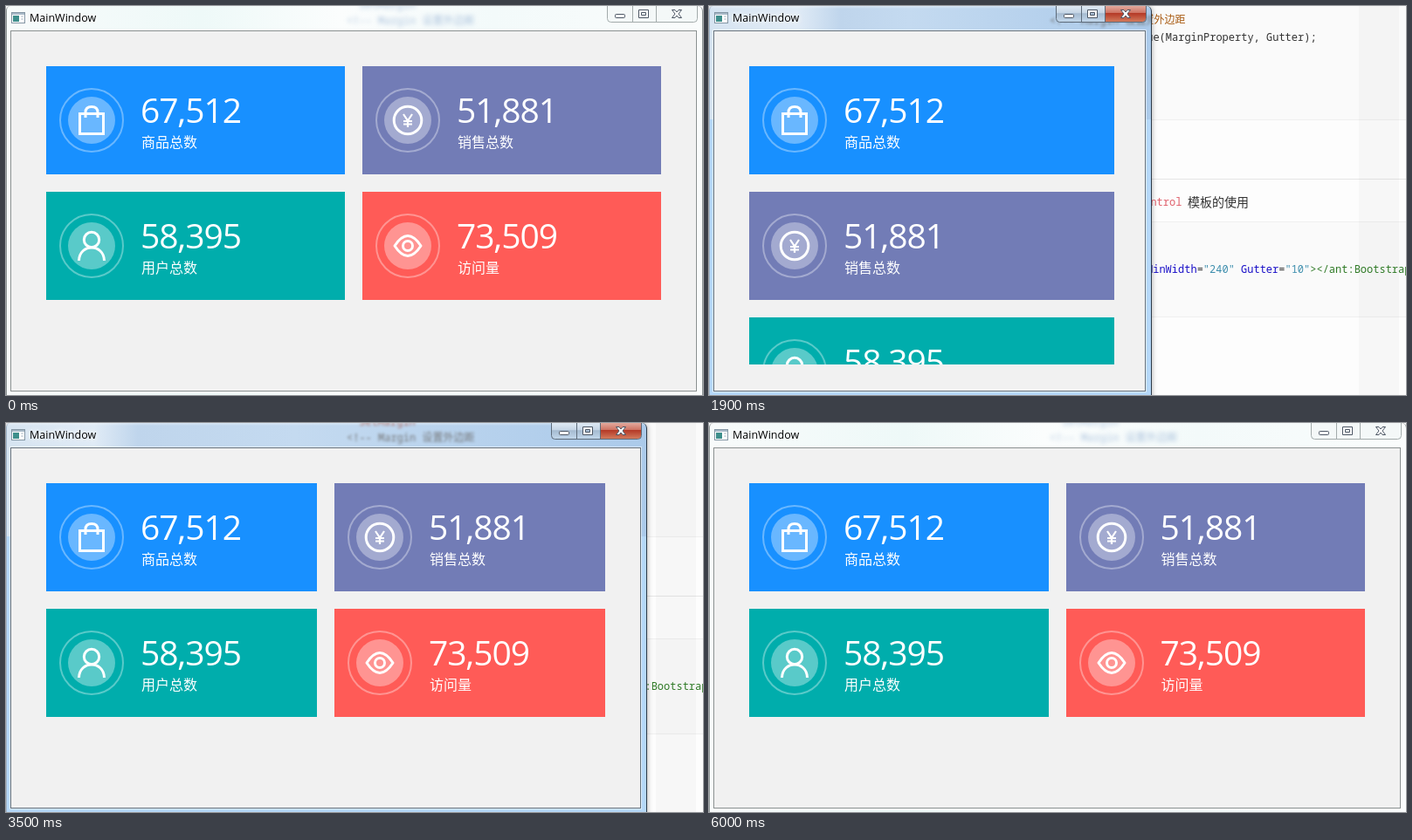
An HTML page for the animation above (6100 ms loop, 798 px wide and 446 px high).

```html
<!DOCTYPE html>
<html lang="zh">
<head>
<meta charset="utf-8">
<style>
html, body { margin: 0; width: 100%; height: 100%; overflow: hidden; }
body { position: relative; background: #fdfdfd; font-family: "Open Sans", "Noto Sans CJK SC", sans-serif; }
body *, svg { box-sizing: border-box; }
body > *, #win > * { position: absolute; }

/* Page behind the window */
.block { left: 0; width: 798px; background: #fafafa; border: solid #efefef; border-width: 1px 0; }
.band { left: 744px; top: 0; width: 46px; height: 446px; background: #00000006; }
.rule { left: 0; top: 198px; width: 798px; height: 1px; background: #e5e5e5; }
.code { font: 12px/16px "Noto Sans Mono", "Noto Sans CJK SC", monospace; white-space: pre; color: #333; }
.code i { font-style: normal; }
.attr { color: #1a10c8; } .val { color: #3f8fae; } .tag { color: #2f7a26; }

/* Window frame */
#win {
  left: 0; top: 0; height: 460px; overflow: hidden;
  border: solid #2d3b4a; border-width: 0 1px; border-left-color: #9fb4c8; border-radius: 5px 6px 0 0;
  background: linear-gradient(#fff6, #fff0 3px),
    linear-gradient(#d9e5f000 130px, #b5d8f8 130px),
    linear-gradient(90deg, #d6e4f1, #e0ebf6 100px, #bfd5ec 150px, #c4daf0 45%, #abcaea);
  box-shadow: 0 0 6px #0005;
}
#win.idle {
  border-color: #8d9494; box-shadow: none;
  background: linear-gradient(90deg, #f8fbfb, #eef9f8 28%, #fbfdfd 48%, #f3fafa 70%, #fafcfc);
}
#win > * { margin-left: -1px; }
.ghost { left: 390px; top: 9px; filter: blur(1.8px); opacity: .75; color: #5c5650; }
.ghost.top { left: 404px; top: -9px; color: #a04c3c; }
.idle .ghost { color: #5b86bc; filter: blur(2.4px); opacity: .5; }
.title { left: 27px; top: 5px; font-size: 12.5px; line-height: 17px; color: #000; text-shadow: 0 0 7px #fff, 0 0 7px #fff; }
.app { left: 6px; top: 7px; }
#win > .caption { right: 5px; top: 0; margin: 0; }
.client { left: 5px; right: 6px; top: 28px; height: 414px; background: #f1f1f1; border: 1px solid #66727d; box-shadow: 0 0 0 1px #fff8; }
.idle .client { border-color: #8a9090; }

/* Cards */
#cards {
  left: 36px; top: 59px; height: 352px; padding: 10px; overflow: hidden;
  display: grid; grid-auto-rows: 124px; gap: 20px;
}
.card { position: relative; color: #fff; }
.card > * { position: absolute; }
.card b { left: 108px; top: 25px; font-weight: 500; font-size: 39px; line-height: 50px; letter-spacing: -1px; }
.card span { left: 109px; top: 75px; font: 500 16px/22px "Noto Sans CJK SC", sans-serif; white-space: nowrap; }
.card svg { left: 15px; top: 25px; }
</style>
</head>
<body>
<div class="block" style="top:-2px;height:133px"></div>
<div class="block" style="top:247px;height:110px"></div>
<div class="rule"></div>
<div class="band"></div>
<div class="code" style="left:464px;top:8px;color:#a85a10">// 设置外边距</div>
<div class="code" style="left:458px;top:28px">SetValue(MarginProperty, Gutter);</div>
<div class="code" style="left:455px;top:217px"><i style="color:#e0606c">ItemsControl</i></div>
<div class="code" style="left:548px;top:216px;font-size:14px;line-height:18px">模板的使用</div>
<div class="code" style="left:357px;top:294px"><i class="tag">&lt;ant:BootstrapPanel</i> <i class="attr">MinWidth</i>=<i class="val">"240"</i> <i class="attr">Gutter</i>=<i class="val">"10"</i><i class="tag">&gt;&lt;/ant:BootstrapPanel&gt;</i></div>

<div id="win">
  <div class="code ghost top">SetMargin</div>
  <div class="code ghost">&lt;!-- Margin 设置外边距</div>
  <svg class="app" width="16" height="14">
    <rect x=".5" y=".5" width="15" height="12" fill="#fff" stroke="#8496a4"/>
    <path d="M1 2H15" stroke="#a9bac8" stroke-width="2"/>
    <rect x="2" y="4" width="7" height="7" fill="#3f8f8c"/>
    <path d="M11 5H14M11 8H14" stroke="#b0bcc6"/>
  </svg>
  <div class="title">MainWindow</div>
  <svg class="caption" width="104" height="20">
    <defs>
      <linearGradient id="glass" x2="0" y2="1"><stop stop-color="#e3edf6"/><stop offset=".45" stop-color="#c5d5e5"/><stop offset=".5" stop-color="#a5bbd1"/><stop offset="1" stop-color="#c3d8ec"/></linearGradient>
      <linearGradient id="red" x2="0" y2="1"><stop stop-color="#e6b0a4"/><stop offset=".45" stop-color="#cf7565"/><stop offset=".5" stop-color="#b53a27"/><stop offset="1" stop-color="#d27a5c"/></linearGradient>
    </defs>
    <path id="pane" d="M.5-1V14.5Q.5 18.5 4.5 18.5H99.5Q103.5 18.5 103.5 14.5V-1Z"/>
    <path id="close" d="M56.5-1V18H99.5Q103 18 103 14.5V-1Z" fill="url(#red)"/>
    <path id="edges" d="M.5-1V14.5Q.5 18.5 4.5 18.5H99.5Q103.5 18.5 103.5 14.5V-1M29.5 0V18M56.5 0V18" fill="none"/>
    <g fill="#fff" stroke="#4c5664">
      <rect x="9.5" y="9.5" width="11" height="4" rx="1"/>
      <path fill-rule="evenodd" d="M36.5 4.5H47.5V13.5H36.5ZM39.5 7.5V10.5H44.5V7.5Z"/>
      <path d="M74.5 4.5H78L80 7L82 4.5H85.5L82 9L85.5 13.5H82L80 11L78 13.5H74.5L78 9Z"/>
    </g>
  </svg>
  <div class="client"></div>
  <div id="cards"></div>
</div>

<script>
const $ = id => document.getElementById(id);
const win = $('win'), cards = $('cards');
const LOOP = 6100, STEP = 100;

const items = [
  ['#1890ff', '67,512', '商品总数', '<path d="M23.5 29.5H50.5V52.5H23.5ZM30 34V28Q30 21.5 37 21.5T44 28V34"/>'],
  ['#727cb6', '51,881', '销售总数', '<circle cx="37" cy="37" r="15.8"/><path d="M32 30L37 37.5L42 30M37 37V45M32 38H42M32 41.5H42" stroke-width="2.2"/>'],
  ['#00adac', '58,395', '用户总数', '<circle cx="37" cy="30" r="8.7"/><path d="M22.5 54C23 34 51 34 51.5 54"/>'],
  ['#ff5b57', '73,509', '访问量', '<path d="M22 37Q37 14 52 37Q37 60 22 37Z" stroke-linejoin="round"/><circle cx="37" cy="37" r="5.5"/>'],
];
cards.innerHTML = items.map(([color, count, label, icon]) => `
  <div class="card" style="background:${color}">
    <svg width="74" height="74" fill="none" stroke="#fff" stroke-width="3">
      <circle cx="37" cy="37" r="36" stroke-width="2" opacity=".35"/>
      <circle cx="37" cy="37" r="27" fill="#fff" stroke="none" opacity=".35"/>
      ${icon}
    </svg>
    <b>${count}</b><span>${label}</span>
  </div>`).join('');

// Right edge of the window while it is dragged: [time, x]
const drag = [
  [0, 797], [1000, 797], [1100, 789], [1200, 767], [1400, 702], [1700, 593],
  [1900, 506], [2000, 475], [2100, 456], [2200, 448], [2500, 448], [2600, 462],
  [2800, 560], [3000, 654], [3100, 685], [3200, 703], [3900, 773], [4400, 793],
  [4800, 793], [4900, 795], [5000, 795], [5100, 798], [LOOP, 798],
];

function edgeAt(t) {
  const i = drag.findIndex(k => k[0] > t);
  const [t0, x0] = drag[i - 1], [t1, x1] = drag[i];
  return Math.round(x0 + (x1 - x0) * (t - t0) / (t1 - t0));
}

function render(now) {
  const t = Math.floor(now % LOOP / STEP) * STEP;
  const edge = edgeAt(t);
  const idle = t < 800 || t >= 6000;
  // A single card trails the shrinking window slightly
  const lag = t < 2200 ? 5 : 0;

  win.className = idle ? 'idle' : '';
  win.style.width = edge + 1 + 'px';
  cards.style.width = edge - 73 + 'px';
  cards.style.gridTemplateColumns = edge < 553 ? `${edge - 93 + lag}px` : '1fr 1fr';
  $('pane').setAttribute('fill', idle ? '#f4f8f8' : 'url(#glass)');
  $('close').style.display = idle ? 'none' : '';
  $('edges').setAttribute('stroke', idle ? '#a3abab' : '#5d6b7a');
}

const start = performance.now();
(function frame() {
  render(performance.now() - start);
  requestAnimationFrame(frame);
})();
</script>
</body>
</html>
```
